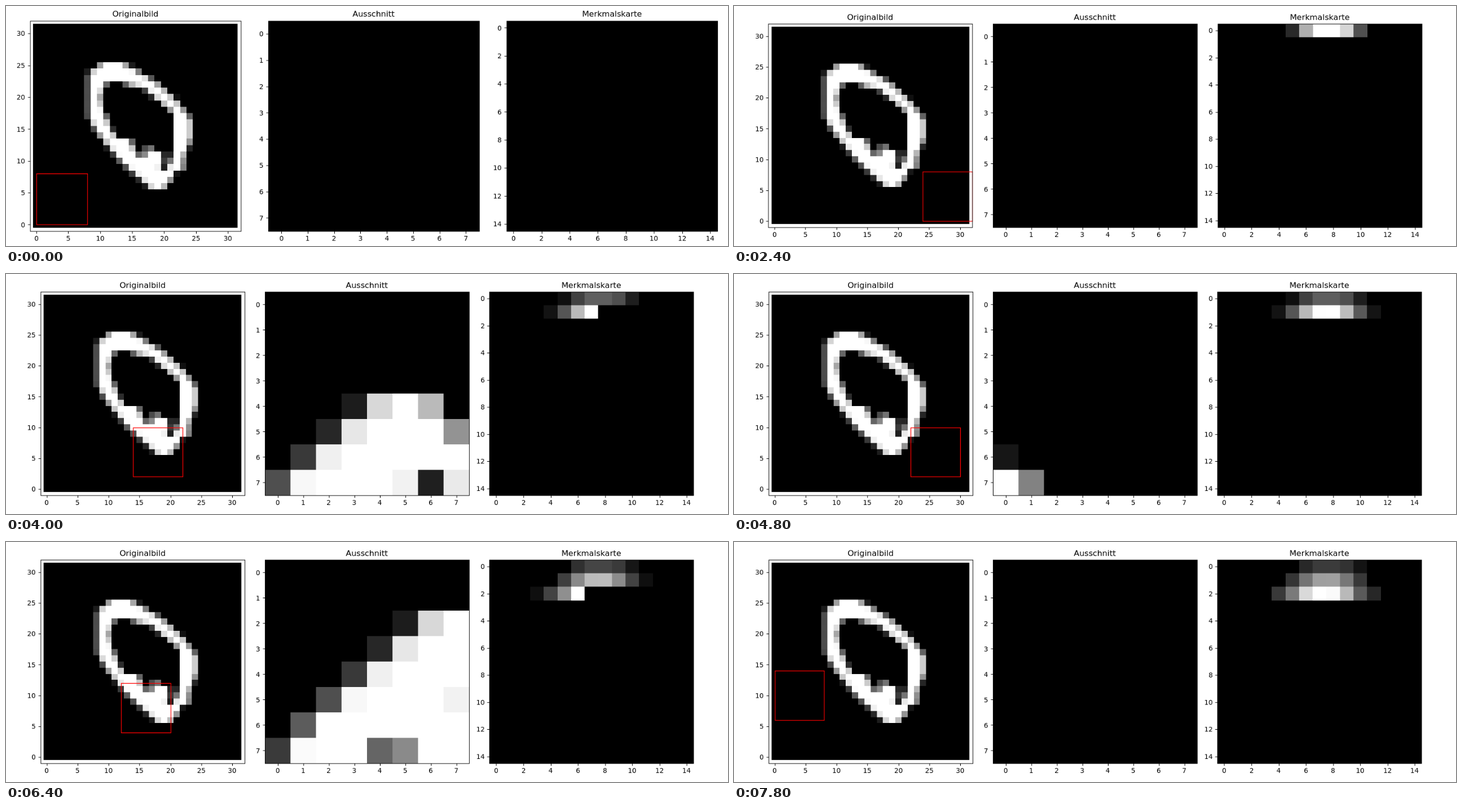
Recreate the animation shown at these times as an HTML page with a canvas. Size 1280 by 427 pixels, loop 8 s.

```html
<!DOCTYPE html>
<html lang="de">
<head>
<meta charset="utf-8">
<title>Merkmalskarte</title>
<style>
  html, body { margin: 0; width: 100%; height: 100%; overflow: hidden; background: #fff; }
  canvas { display: block; }
</style>
</head>
<body>
<canvas id="stage" width="1280" height="427"></canvas>
<script>
const STEP_MS = 200, STEPS = 40;
const SIZE = 32, WIN = 8, STRIDE = 2, PER_ROW = 13, MAP = 15;

// The figure is drawn at 100 dpi and scaled down to the stage.
const FIG_W = 1500, FIG_H = 500, PT = 100 / 72;
const stage = document.getElementById('stage');
const view = stage.getContext('2d');
const figure = makeCanvas(FIG_W, FIG_H);
const ctx = figure.getContext('2d');

function makeCanvas(w, h) {
  return Object.assign(document.createElement('canvas'), { width: w, height: h });
}

const grid = (n, fn) => Array.from({ length: n }, (_, r) =>
  Array.from({ length: n }, (_, c) => fn(r, c)));

// The handwritten zero: an outline and its hole, rasterised on a 32 x 32 grid.
const OUTLINE = 'M11 6L8.7 7.8 8.7 14.8 10 17 13.6 21.6 18.6 26 20.3 26 22 24 ' +
  '22.2 23 23.5 23 23.6 20.7 24.8 18 24.8 15 22.4 12 19.1 9 13.9 6Z';
const HOLE = 'M11 10L11.8 9.1 13.5 8.9 15.5 9.8 17.2 10 22 14 22 20 21.4 22 20.6 23 ' +
  '19.8 23 20.3 21.5 20.1 20 19.2 20 18.6 19.4 17.4 19.4 17.5 20.9 16.8 20.9 ' +
  '16 20 15.2 18.1 13.3 18 12.4 17 11 13.5 10.6 11.5Z';

function rasterise(path) {
  const small = makeCanvas(SIZE, SIZE).getContext('2d', { willReadFrequently: true });
  small.fill(new Path2D(path), 'evenodd');
  const { data } = small.getImageData(0, 0, SIZE, SIZE);
  return grid(SIZE, (y, x) => data[((SIZE - 1 - y) * SIZE + x) * 4 + 3] / 255);
}
const digit = rasterise(OUTLINE + HOLE);

const windowPos = n => [n % PER_ROW * STRIDE, Math.floor(n / PER_ROW) * STRIDE];
const crop = n => {
  const [x, y] = windowPos(n);
  return grid(WIN, (r, c) => digit[y + r][x + c]);
};
const sums = Array.from({ length: STEPS }, (_, n) => crop(n).flat().reduce((a, b) => a + b, 0));
const featureMap = n => grid(MAP, (r, c) => {
  const k = r * PER_ROW + c;
  return c < PER_ROW && k <= n ? sums[k] : 0;
});

// The layout is re-tightened at every step: the slack around the square panels
// is taken off the margins and gaps, which settles towards even spacing.
function makeLayouts() {
  const pad = 15, label = 27.3;
  let slack = 0;
  return Array.from({ length: STEPS }, (_, n) => {
    const size = n ? 424 : 438, top = n ? 36.9 : 30.7;
    const left = pad + Math.max(label - slack, 0), right = FIG_W - pad;
    const gap = pad + label - 2 * slack;
    const slot = (right - left - 2 * gap) / 3;
    slack = (slot - size) / 2;
    return { mid: (left + right) / 2, pitch: slot + gap, size, top };
  });
}
const layouts = makeLayouts();

function fillBox(color, x0, y0, x1, y1) {
  const [l, t, r, b] = [x0, y0, x1, y1].map(Math.round);
  ctx.fillStyle = color;
  ctx.fillRect(l, t, r - l, b - t);
}

const snap = v => Math.round(v) + 0.5;

function strokeBox(color, width, x0, y0, x1, y1) {
  ctx.strokeStyle = color;
  ctx.lineWidth = width;
  ctx.strokeRect(snap(x0), snap(y0), snap(x1) - snap(x0), snap(y1) - snap(y0));
}

// Cells in grey, scaled to the largest value; the faintest stay black.
function drawCells(cells, px, py) {
  const max = Math.max(...cells.flat()) || 1;
  cells.forEach((row, r) => row.forEach((v, c) => {
    if (v / max < 0.058) return;
    const g = Math.round(v / max * 255);
    fillBox(`rgb(${g},${g},${g})`, px(c - 0.5), py(r - 0.5), px(c + 0.5), py(r + 0.5));
  }));
}

// align: 0 left, 0.5 centre, 1 right
function text(str, x, y, pt, align) {
  ctx.font = `${pt * PT}px "DejaVu Sans", sans-serif`;
  ctx.fillStyle = '#000';
  ctx.fillText(str, Math.round(x - ctx.measureText(str).width * align), Math.round(y));
}

function drawAxes(box, title, last, step, px, py) {
  const { left, right, top, bottom } = box;
  const line = 0.8 * PT, tick = 3.5 * PT;
  strokeBox('#000', line, left, top, right, bottom);
  text(title, (left + right) / 2, top - 6 * PT, 12, 0.5);
  ctx.fillStyle = '#000';
  for (let v = 0; v <= last; v += step) {
    const x = px(v), y = py(v);
    ctx.fillRect(snap(x) - line / 2, snap(bottom), line, tick);
    ctx.fillRect(snap(left) - tick, snap(y) - line / 2, tick, line);
    text(v, x, bottom + 2 * tick + 10.6, 10, 0.5);
    text(v, left - 2 * tick, y + 5.2, 10, 1);
  }
}

function panel({ mid, pitch, size, top }, i) {
  const left = mid + (i - 1) * pitch - size / 2;
  return { left, top, size, right: left + size, bottom: top + size };
}

function drawSource(box, n) {
  const unit = box.size / (SIZE + 1);
  const px = v => box.left + (v + 1) * unit;
  const py = v => box.bottom - (v + 1) * unit;
  const end = SIZE - 0.5;
  fillBox('#000', px(-0.5), py(end), px(end), py(-0.5));
  drawCells(digit, px, py);
  const [x, y] = windowPos(n);
  strokeBox('#f00', PT, px(x), py(y + WIN), px(x + WIN), py(y));
  drawAxes(box, 'Originalbild', 30, 5, px, py);
}

function drawMatrix(box, cells, title, step) {
  const unit = box.size / cells.length;
  const px = v => box.left + (v + 0.5) * unit;
  const py = v => box.top + (v + 0.5) * unit;
  fillBox('#000', box.left, box.top, box.right, box.bottom);
  drawCells(cells, px, py);
  drawAxes(box, title, cells.length - 1, step, px, py);
}

function draw(n) {
  fillBox('#fff', 0, 0, FIG_W, FIG_H);
  drawSource(panel(layouts[n], 0), n);
  drawMatrix(panel(layouts[n], 1), crop(n), 'Ausschnitt', 1);
  drawMatrix(panel(layouts[n], 2), featureMap(n), 'Merkmalskarte', 2);
  view.drawImage(figure, 0, 0, stage.width, stage.height);
}

const start = performance.now();
let shown = -1;
function tick() {
  const n = Math.floor((performance.now() - start) / STEP_MS) % STEPS;
  if (n !== shown) draw(shown = n);
  requestAnimationFrame(tick);
}
tick();
</script>
</body>
</html>
```
